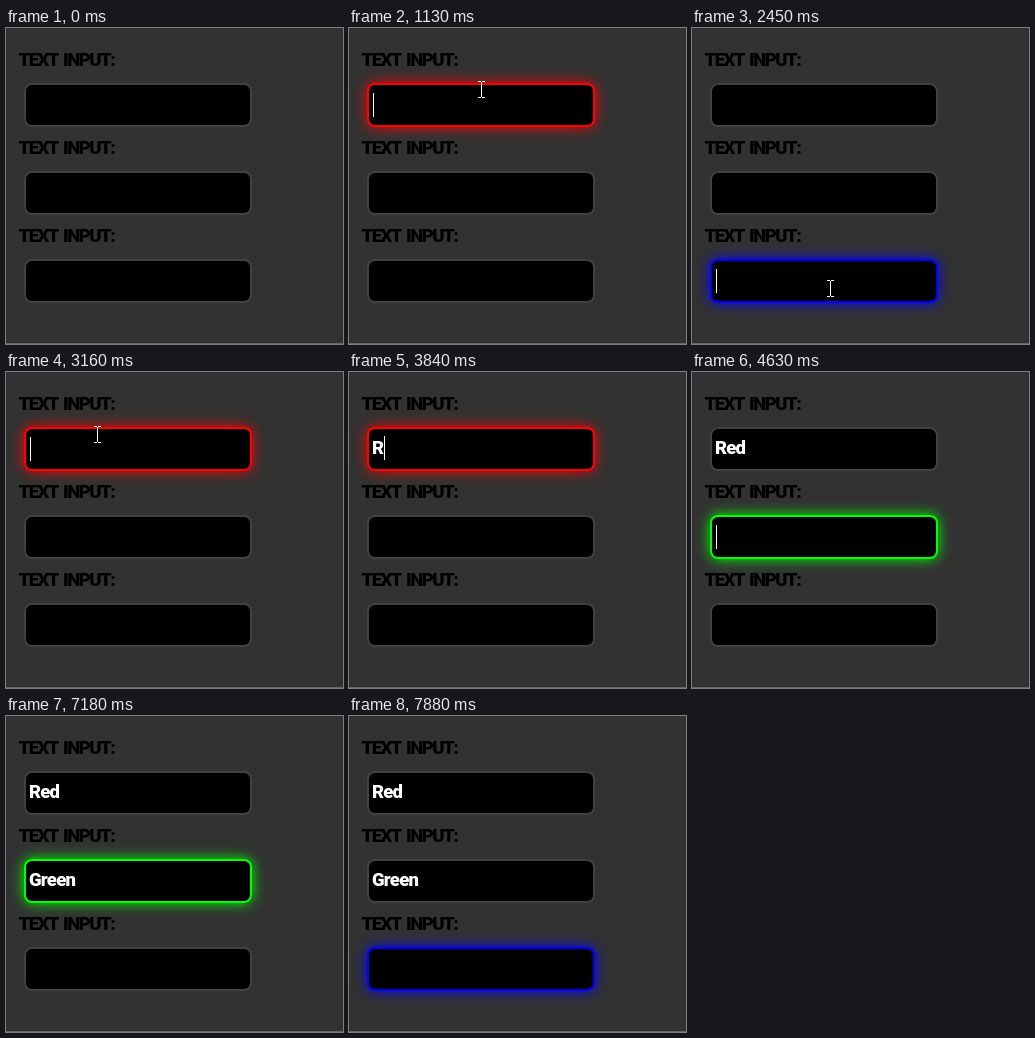
Recreate the animation shown at these times as an HTML page with a canvas. Size 337 px wide and 316 px high, loop 8000 ms.

```html
<!DOCTYPE html>
<html lang="en">
<head>
<meta charset="utf-8">
<title>Text inputs</title>
<style>
  html, body { margin: 0; width: 100%; height: 100%; overflow: hidden; background: #323232; }
  canvas { display: block; }
</style>
</head>
<body>
<canvas id="stage" width="337" height="316"></canvas>
<script>
const ctx = document.getElementById('stage').getContext('2d');
const LOOP = 8000, BLINK = 510;
const FIELD = { x: 18, y: 55, w: 228, h: 44, pitch: 88 };
const COLORS = ['#ff0000', '#00ff00', '#0000ff'];

// [time, focused field]
const focusLog = [[0, -1], [1130, 0], [1810, 1], [2450, 2], [3160, 0], [4630, 1], [7350, 2]];

const typing = [
  { word: 'Red', times: [3840, 4140, 4370] },
  { word: 'Green', times: [5590, 5850, 6050, 6220, 6650] },
  { word: '', times: [] }
];

const easeOut = p => 1 - (1 - p) ** 2;
const easeInOut = p => p * p * (3 - 2 * p);
const easeIn = p => p ** 1.5;

const moves = [
  { start: 500, end: 900, from: [320, 1], to: [132, 61], ease: easeOut },
  { start: 1360, end: 1640, from: [132, 61], to: [141, 186], ease: easeInOut },
  { start: 2070, end: 2400, from: [141, 186], to: [138, 260], ease: easeInOut },
  { start: 2520, end: 2790, from: [138, 260], to: [91, 62], ease: easeInOut },
  { start: 3160, end: 3410, from: [91, 62], to: [187, 320], ease: easeIn }
];

const fieldTop = i => FIELD.y + i * FIELD.pitch;
const lastBefore = (list, t, time) => list.filter(item => time(item) <= t).pop();

function drawField(i, focused) {
  const { x, w, h } = FIELD, y = fieldTop(i);
  ctx.save();
  ctx.beginPath();
  ctx.roundRect(x, y, w, h, 8);
  ctx.fillStyle = focused ? COLORS[i] : '#414141';
  if (focused) {
    ctx.shadowColor = COLORS[i];
    ctx.shadowBlur = 14;
  }
  ctx.fill();
  ctx.restore();
  ctx.beginPath();
  ctx.roundRect(x + 2, y + 2, w - 4, h - 4, 6);
  ctx.fillStyle = '#000';
  ctx.fill();
}

function drawCaret(i, text, t, since) {
  if (Math.floor((t - since) / BLINK) % 2) return;
  const x = 24 + Math.floor(ctx.measureText(text).width);
  ctx.fillStyle = '#fff';
  ctx.fillRect(x, fieldTop(i) + (text ? 9 : 10), 1, 24);
}

function drawRow(i, t, focus) {
  const top = fieldTop(i), { word, times } = typing[i];
  const typed = times.filter(time => time <= t);
  const text = word.slice(0, typed.length);
  const focused = focus[1] === i;

  drawField(i, focused);
  ctx.letterSpacing = '-1.5px';
  ctx.wordSpacing = '2px';
  ctx.fillStyle = '#000';
  ctx.fillText('TEXT INPUT:', 12.5, top - 17);
  ctx.letterSpacing = '-0.8px';
  ctx.fillStyle = '#fff';
  ctx.fillText(text, 23, top + 27);
  if (focused) drawCaret(i, text, t, Math.max(focus[0], ...typed));
}

function drawBeam(x, y) {
  ctx.fillStyle = '#fff';
  ctx.fillRect(x, y - 7, 1, 15);
  for (const end of [y - 8, y + 8]) {
    ctx.fillRect(x - 3, end, 3, 1);
    ctx.fillRect(x + 1, end, 3, 1);
  }
}

function drawArrow(x, y) {
  const outline = [[0, 0], [0, 16], [4, 12.5], [6.5, 18], [9, 17], [6.5, 11.5], [11.5, 11.5]];
  ctx.beginPath();
  for (const [dx, dy] of outline) ctx.lineTo(x + dx + 0.5, y + dy + 0.5);
  ctx.closePath();
  ctx.fillStyle = '#fff';
  ctx.fill();
  ctx.strokeStyle = '#000';
  ctx.lineWidth = 1;
  ctx.stroke();
}

function overField(x, y) {
  const { x: left, w, h } = FIELD;
  return x >= left && x < left + w &&
    COLORS.some((_, i) => y >= fieldTop(i) && y < fieldTop(i) + h);
}

function drawPointer(t) {
  const move = lastBefore(moves, t, m => m.start);
  if (!move || t >= 3410) return;
  const p = move.ease(Math.min(1, (t - move.start) / (move.end - move.start)));
  const [x, y] = move.from.map((a, k) => Math.round(a + (move.to[k] - a) * p));
  (overField(x, y) ? drawBeam : drawArrow)(x, y);
}

function draw(t) {
  ctx.fillStyle = '#323232';
  ctx.fillRect(0, 0, 337, 316);
  ctx.fillStyle = '#666';
  ctx.fillRect(0, 315, 337, 1);
  ctx.font = '900 18.5px Roboto, sans-serif';
  const focus = lastBefore(focusLog, t, f => f[0]);
  for (let i = 0; i < 3; i++) drawRow(i, t, focus);
  drawPointer(t);
}

const began = performance.now();
function tick() {
  draw((performance.now() - began) % LOOP);
  requestAnimationFrame(tick);
}
tick();
</script>
</body>
</html>
```
